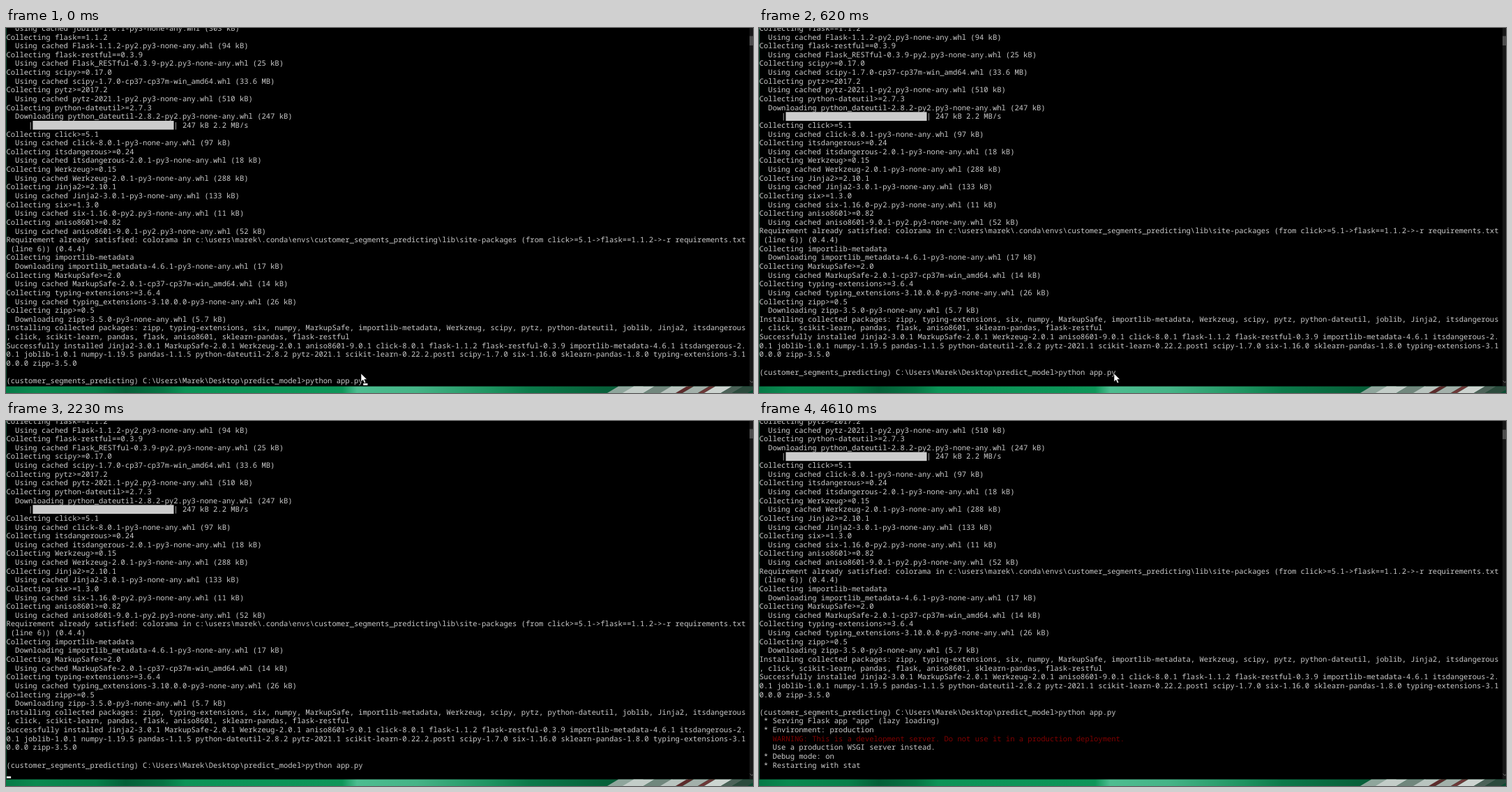
An HTML page for the animation above (8000 ms loop, 1071 px wide and 523 px high).

```html
<!DOCTYPE html>
<html lang="en">
<head>
<meta charset="utf-8">
<title>Terminal</title>
<style>
html, body { margin: 0; width: 100%; height: 100%; overflow: hidden; background: #000; }
svg { display: block; width: 1071px; height: 523px; }
text {
  font: 10.528px "Noto Sans Mono", "DejaVu Sans Mono", monospace;
  white-space: pre;
  text-rendering: geometricPrecision;
  fill: #ccc;
}
</style>
</head>
<body>
<svg viewBox="0 0 1071 523">
  <defs>
    <clipPath id="pane"><rect width="1066" height="512.6"/></clipPath>
    <linearGradient id="desk">
      <stop offset="0" stop-color="#067a47"/>
      <stop offset=".04" stop-color="#0a8a50"/>
      <stop offset=".12" stop-color="#07804a"/>
      <stop offset=".16" stop-color="#046038"/>
      <stop offset=".21" stop-color="#067544"/>
      <stop offset=".24" stop-color="#0b9457"/>
      <stop offset=".45" stop-color="#0d9659"/>
      <stop offset=".47" stop-color="#4dbd90"/>
      <stop offset=".55" stop-color="#45b487"/>
      <stop offset=".65" stop-color="#1d9360"/>
      <stop offset=".7" stop-color="#0b7a4a"/>
      <stop offset=".8" stop-color="#07613a"/>
      <stop offset="1" stop-color="#0a4a30"/>
    </linearGradient>
  </defs>
  <rect width="1071" height="523"/>
  <g clip-path="url(#pane)">
    <g id="log"></g>
    <rect id="caret" width="6.3" height="2.7" fill="#f2f2f2"/>
  </g>
  <rect width="1" height="513.5" fill="#0b4a30"/>
  <rect x="1066" width="5" height="513" fill="#171717"/>
  <rect id="thumb" x="1066" width="5" height="13.5" fill="#4d4d4d"/>
  <path d="M1066.8 505.5l2.6 2.6 2.6-2.6" fill="none" stroke="#777"/>
  <rect y="513.5" width="1071" height="9.5" fill="url(#desk)"/>
  <g id="streaks"></g>
  <path id="mouse" d="M0 0v12l2.8-2.7 2 4.6 2-.9-2-4.4h3.8z" fill="#fff" stroke="#000" stroke-width=".6"/>
</svg>
<script>
const NS = 'http://www.w3.org/2000/svg';
const COL = 6.317, ROW = 12.635, LEFT = 0.5;
const TOP = -6, BASE = 9.9, BAR_ROW = 11;
const LOOP = 8000;
const $ = id => document.getElementById(id);

const lines = String.raw`  Using cached joblib-1.0.1-py3-none-any.whl (303 kB)
Collecting flask==1.1.2
  Using cached Flask-1.1.2-py2.py3-none-any.whl (94 kB)
Collecting flask-restful==0.3.9
  Using cached Flask_RESTful-0.3.9-py2.py3-none-any.whl (25 kB)
Collecting scipy>=0.17.0
  Using cached scipy-1.7.0-cp37-cp37m-win_amd64.whl (33.6 MB)
Collecting pytz>=2017.2
  Using cached pytz-2021.1-py2.py3-none-any.whl (510 kB)
Collecting python-dateutil>=2.7.3
  Downloading python_dateutil-2.8.2-py2.py3-none-any.whl (247 kB)
     |                                | 247 kB 2.2 MB/s
Collecting click>=5.1
  Using cached click-8.0.1-py3-none-any.whl (97 kB)
Collecting itsdangerous>=0.24
  Using cached itsdangerous-2.0.1-py3-none-any.whl (18 kB)
Collecting Werkzeug>=0.15
  Using cached Werkzeug-2.0.1-py3-none-any.whl (288 kB)
Collecting Jinja2>=2.10.1
  Using cached Jinja2-3.0.1-py3-none-any.whl (133 kB)
Collecting six>=1.3.0
  Using cached six-1.16.0-py2.py3-none-any.whl (11 kB)
Collecting aniso8601>=0.82
  Using cached aniso8601-9.0.1-py2.py3-none-any.whl (52 kB)
Requirement already satisfied: colorama in c:\users\marek\.conda\envs\customer_segments_predicting\lib\site-packages (from click>=5.1->flask==1.1.2->-r requirements.txt
 (line 6)) (0.4.4)
Collecting importlib-metadata
  Downloading importlib_metadata-4.6.1-py3-none-any.whl (17 kB)
Collecting MarkupSafe>=2.0
  Using cached MarkupSafe-2.0.1-cp37-cp37m-win_amd64.whl (14 kB)
Collecting typing-extensions>=3.6.4
  Using cached typing_extensions-3.10.0.0-py3-none-any.whl (26 kB)
Collecting zipp>=0.5
  Downloading zipp-3.5.0-py3-none-any.whl (5.7 kB)
Installing collected packages: zipp, typing-extensions, six, numpy, MarkupSafe, importlib-metadata, Werkzeug, scipy, pytz, python-dateutil, joblib, Jinja2, itsdangerous
, click, scikit-learn, pandas, flask, aniso8601, sklearn-pandas, flask-restful
Successfully installed Jinja2-3.0.1 MarkupSafe-2.0.1 Werkzeug-2.0.1 aniso8601-9.0.1 click-8.0.1 flask-1.1.2 flask-restful-0.3.9 importlib-metadata-4.6.1 itsdangerous-2.
0.1 joblib-1.0.1 numpy-1.19.5 pandas-1.1.5 python-dateutil-2.8.2 pytz-2021.1 scikit-learn-0.22.2.post1 scipy-1.7.0 six-1.16.0 sklearn-pandas-1.8.0 typing-extensions-3.1
0.0.0 zipp-3.5.0

(customer_segments_predicting) C:\Users\Marek\Desktop\predict_model>python app.py
 * Serving Flask app "app" (lazy loading)
 * Environment: production
   WARNING: This is a development server. Do not use it in a production deployment.
   Use a production WSGI server instead.
 * Debug mode: on
 * Restarting with stat`.split('\n');

const promptRow = lines.findIndex(s => s.startsWith('(customer'));
const promptEnd = LEFT + lines[promptRow].length * COL;

function add(parent, tag, attrs) {
  const el = document.createElementNS(NS, tag);
  for (const k in attrs) el.setAttribute(k, attrs[k]);
  return parent.appendChild(el);
}

const output = lines.map((s, i) => {
  const el = add($('log'), 'text', { x: LEFT, y: TOP + BASE + i * ROW });
  el.textContent = s;
  if (s.includes('WARNING')) el.style.fill = '#800000';
  return el;
}).slice(promptRow + 1);

add($('log'), 'rect', {
  x: LEFT + 6 * COL, y: TOP + BAR_ROW * ROW, width: 32 * COL, height: ROW, fill: '#ccc'
});

// Slanted wallpaper bands below the window: x, width, colour
[
  [862, 36, '#8fa69c'], [884, 30, '#c3cdc8'], [914, 26, '#71877d'],
  [938, 24, '#b9c4bf'], [960, 10, '#5c2b2b'], [970, 22, '#a3b0aa'],
  [992, 9, '#6d3838'], [1001, 24, '#cdd4d0'], [1025, 16, '#4c6258'],
  [1041, 22, '#2b4a3c']
].forEach(([x, w, fill]) =>
  add($('streaks'), 'path', { d: `M${x} 523l16-9.5h${w}l-16 9.5z`, fill }));

const within = (t, spans) => spans.some(([a, b]) => t >= a && t < b);

function mouseAt(t) {
  if (t < 990) return [509, 495];
  const step = Math.floor((t - 990) / 120);
  return [516 - step * 3, 502 - step * 17.2];
}

function draw(t) {
  const entered = t >= 370, served = t >= 4610;
  const shift = served ? 7 : entered ? 1 : 0;
  $('log').setAttribute('transform', `translate(0 ${-shift * ROW})`);
  output.forEach(el => el.setAttribute('visibility', served ? 'visible' : 'hidden'));
  $('thumb').setAttribute('y', served ? 12.5 : 11.5);

  const blink = within(t, [[0, 120], [370, 620], [1230, 1730], [2230, 2730], [3230, 3730]]);
  $('caret').setAttribute('visibility', blink ? 'visible' : 'hidden');
  $('caret').setAttribute('x', entered ? LEFT + 0.3 : promptEnd);
  $('caret').setAttribute('y', 509.2);

  $('mouse').setAttribute('visibility', t < 1470 ? 'visible' : 'hidden');
  $('mouse').setAttribute('transform', `translate(${mouseAt(t)})`);
}

const start = performance.now();
function tick(now) {
  draw(Math.max(0, now - start) % LOOP);
  requestAnimationFrame(tick);
}
draw(0);
requestAnimationFrame(tick);
</script>
</body>
</html>
```
